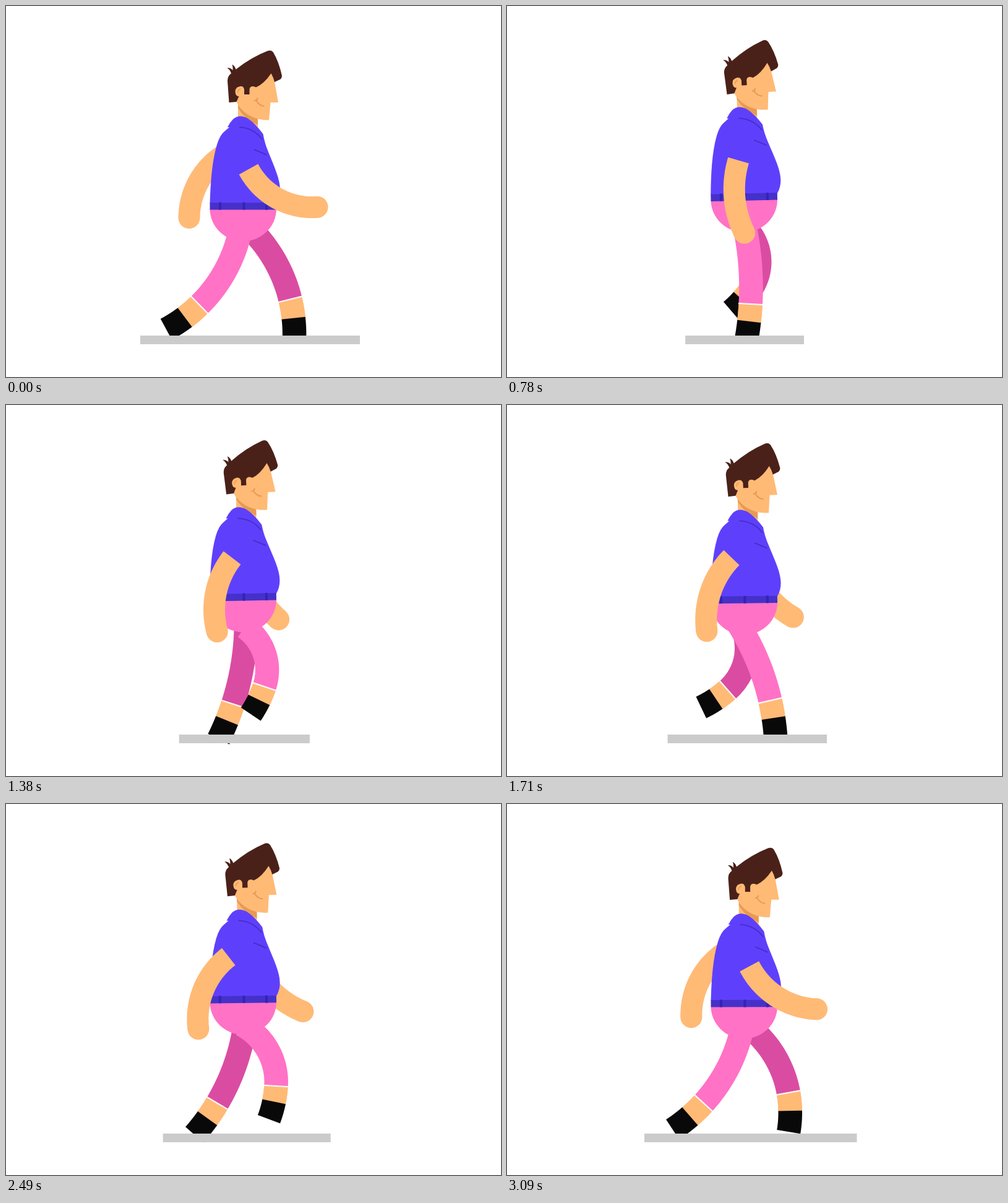
Animation of 800 by 600 pixels, one loop 3120 ms. Source, as an HTML page with a canvas:

```html
<!DOCTYPE html>
<html lang="en">
<head>
<meta charset="utf-8">
<title>Walk cycle</title>
<style>
html, body { margin: 0; width: 100%; height: 100%; overflow: hidden; background: #fff; }
canvas { display: block; }
</style>
</head>
<body>
<canvas id="stage" width="800" height="600"></canvas>
<script>
const ctx = document.getElementById('stage').getContext('2d');
const CYCLE = 1040, RAD = Math.PI / 180;
const SKIN = '#ffba76', SHADE = '#e79a52', HAIR = '#4a2119', SHIRT = '#5e40fc', BELT = '#4531c9',
  LOOP = '#3423b5', PINK = '#ff72c6', DARK_PINK = '#da4ca2', SHOE = '#0a0909', GROUND = '#cbcbcb';

// Cosine and sine of a limb's phase, and the size of the sine
function swing(phase) {
  const a = 2 * Math.PI * phase, s = Math.sin(a);
  return [Math.cos(a), s, Math.abs(s)];
}

// Rise of the body, once per step
function rise(phase) {
  const step = phase * 2 % 1;
  return 1.75 * Math.sin(Math.PI * step ** 1.1) ** 1.6;
}

// Strokes an arc; angle 0 points down, positive angles lean back
function hose(color, width, x, y, angle, bend, length) {
  const steps = 40, ds = length / steps;
  ctx.beginPath();
  ctx.moveTo(x, y);
  for (let i = 0; i < steps; i++) {
    const mid = (angle + bend * ds / 2) * RAD;
    x -= Math.sin(mid) * ds;
    y += Math.cos(mid) * ds;
    angle += bend * ds;
    ctx.lineTo(x, y);
  }
  ctx.strokeStyle = color;
  ctx.lineWidth = width;
  ctx.stroke();
  return [x, y, angle];
}

// Phase 0 is the toe-off, 0.5 the heel strike
function leg(phase, color) {
  const [c, s, size] = swing(phase), air = Math.max(s, 0), w = 38.5;
  const x = 386 - 73.5 * c + 22 * c * size + 8 * s * s;
  const y = 479 + 4.7 * c + 3 * s * s - 24 * air * (2 - air);
  const angle = 16 + 29.5 * c + 16 * s + 3 * s * s;
  const bend = .24 + .31 * s + .19 * size, low = Math.min(bend, .31);
  const shin = 31 - 3 * s - 6 * size;
  hose(color, w, x, y, angle, bend, -shin * 4.7);
  hose(SKIN, w, x, y, angle, low, shin * 1.1);
  const ankle = hose(SKIN, w, x, y, angle, low, shin);
  hose(SHOE, w, ...ankle, low, shin * 1.16);
  hose('#fff', w + 1, x, y, angle, 0, 1.1);
  hose('#fff', w + 1, x, y, angle, 0, -1.1);
}

// Phase 0 is the hand in front, 0.5 behind
function arm(phase, dx, dy) {
  const [c, s, size] = swing(phase);
  const x = 374 + 18 * c, y = 257 + 7 * c - 7.5 * size;
  const handX = 397 + 106 * c + 3 * s - 11 * s * s;
  const handY = 341 - 16 * c + 26 * size + 12 * c * size;
  const angle = 17 - 45 * c;
  const chord = Math.hypot(handX - x, handY - y);
  const turn = Math.atan2(x - handX, handY - y) / RAD - angle, r = turn * RAD;
  const length = Math.abs(r) < .01 ? chord : chord * r / Math.sin(r);
  hose(SKIN, 35, x + dx, y + dy, angle, 2 * turn / length, length);
  ctx.beginPath();
  ctx.arc(handX + dx, handY + dy, 17.5, 0, 7);
  ctx.fillStyle = SKIN;
  ctx.fill();
}

function fill(color, d) {
  ctx.fillStyle = color;
  ctx.fill(new Path2D(d));
}

function line(color, width, d) {
  ctx.strokeStyle = color;
  ctx.lineWidth = width;
  ctx.stroke(new Path2D(d));
}

function turnAbout(x, y, deg) {
  ctx.translate(x, y);
  ctx.rotate(deg * RAD);
  ctx.translate(-x, -y);
}

function head() {
  fill(SKIN, 'M428 105L434 122L440 156H427.5L425 184.5C408 185 388 179 375 160L372 154V130L400 110Z');
  fill(HAIR, 'M360.5 156L358 121Q358 113 364 109Q362 103 357.5 100Q363 99.5 366.5 104Q367 99 365.5 94.5Q370 97 371.5 102.5Q396 83 423 72.5Q429 70.5 432 75Q441 90 446 113Q446 116.5 443.5 118.5L434 123Q432 115 428.5 109Q417 126 404 131.5C398 128.5 393.5 130 393.5 136V143H385V134L376 147L372.5 155Z');
  fill(SKIN, 'M385 135Q384 129 378 130Q370 132 370.5 139Q371 145 375 146L385 147Z');
  line(SHADE, 1.5, 'M374.5 140Q375 135.5 379 134');
  line(SHADE, 2, 'M404 152Q409 161.5 417.5 162M401 153Q406.5 153 406.5 148.5');
}

function torso(lift) {
  fill(SKIN, 'M375 150H407V198H375Z');
  fill(SHADE, 'M375 158Q388 178 407 180V192.5Q386 184 375 165Z');
  ctx.save();
  turnAbout(392, 190, -1.3 * lift);
  head();
  ctx.restore();
  fill(SHIRT, 'M329.5 319C330.5 285 333 250 341 224Q346 208 354 202L361 196H358Q362 188 367 183Q377 174 391 182Q403 190 415.5 207Q418 222 424 236C433.5 260 443 280 443 297Q443 309 437 319Z');
  line(BELT, 2, 'M377 196Q400 197 414.5 216M401 232L422 241');
  fill(BELT, 'M329.5 318H437V329.5H329.5Z');
  fill(LOOP, 'M344 317.5h4v12h-4zM382.5 317.5h4v12h-4zM419 317.5h4v12h-4z');
}

// Draws a part in the frame of the rising, leaning body
function onBody(lift, part) {
  ctx.save();
  ctx.translate(0, -8.5 * lift);
  turnAbout(383, 329, -.7 * lift);
  part(lift);
  ctx.restore();
}

function draw(ms) {
  const phase = ms / CYCLE % 1, lift = rise(phase);
  ctx.fillStyle = '#fff';
  ctx.fillRect(0, 0, 800, 600);
  arm(phase + .5, 5, -14.5);
  leg(phase + .5, DARK_PINK);
  onBody(lift, () => fill(PINK, 'M329.5 328H437A53.75 52.5 0 0 1 329.5 328Z'));
  leg(phase, PINK);
  onBody(lift, torso);
  arm(phase, 0, 0);
  const left = 217 + 41 * lift, right = 572 - 53 * lift;
  ctx.fillStyle = GROUND;
  ctx.fillRect(left, 533, right - left, 14);
}

const start = performance.now();
function tick() {
  draw(performance.now() - start);
  requestAnimationFrame(tick);
}
tick();
</script>
</body>
</html>
```
